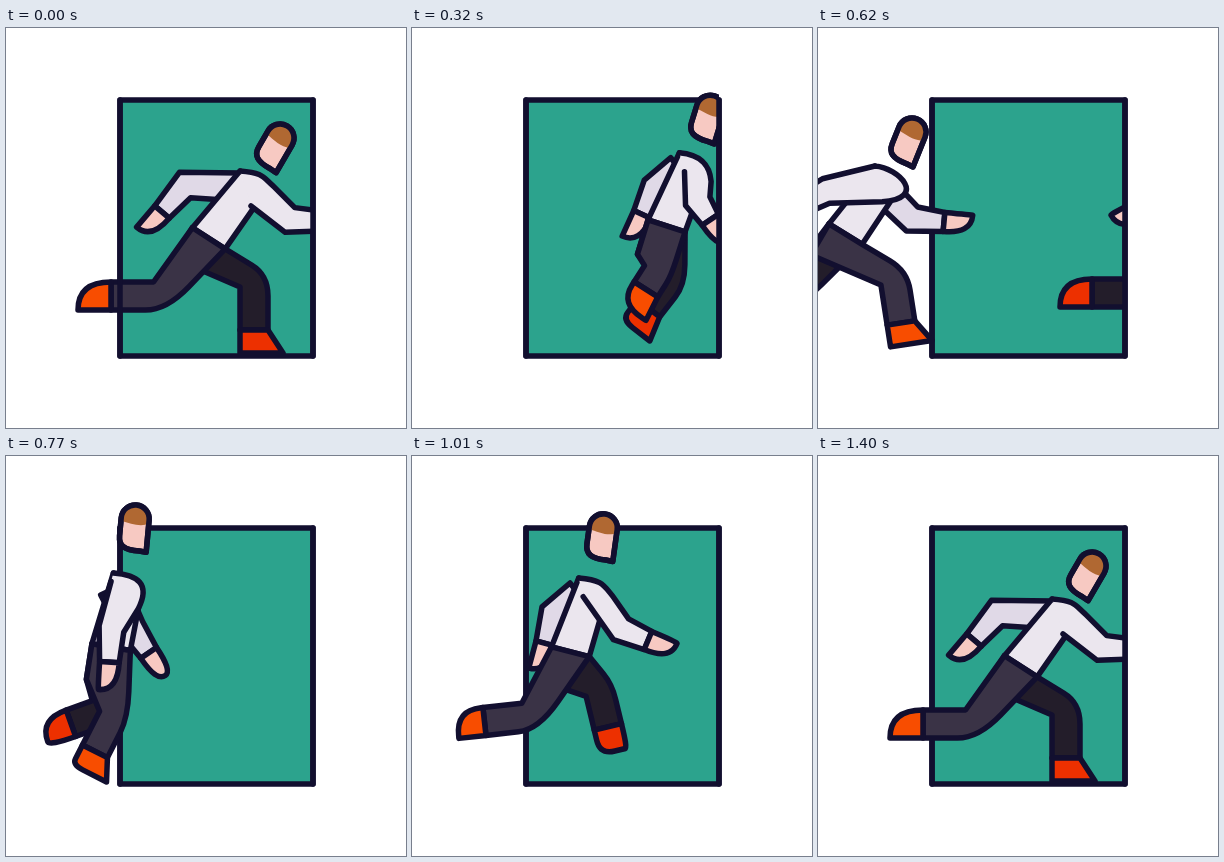
Animation of 400x400 px, one loop 1460 ms. Source, as an HTML page with a canvas:

```html
<!DOCTYPE html>
<html lang="en">
<head>
<meta charset="utf-8">
<title>Runner through a door</title>
<style>
  html, body { margin: 0; width: 100%; height: 100%; overflow: hidden; background: #fff; }
  canvas { display: block; width: 400px; height: 400px; }
</style>
</head>
<body>
<canvas id="stage" width="400" height="400"></canvas>
<script>
const ctx = document.getElementById('stage').getContext('2d');

const LOOP = 1460, HOLD = 230, TICK = 30, STEPS = 40, STRIDE = 350;
const DOOR = { x: 114, y: 72, w: 193, h: 256 };
const INK = '#120f2f', GREEN = '#2ca38d', SKIN = '#f7c9c2', HAIR = '#b06832', SHIRT = '#ebe6ee';
const NEAR = { leg: '#3a3346', shoe: '#f84d00', sleeve: SHIRT };
const FAR = { leg: '#231d2a', shoe: '#ed3000', sleeve: '#e0d9e7' };

// Pose tracks: one value per key step, limbs relative to the neck.
const KEYS = [0, 8, 14, 18, 23, 32, STEPS];
const body = {
  x: [234, 303, 407, 451, 478, 561],
  y: [143, 115, 138, 118, 115, 135],
  lean: [40, 17, 38.5, 18, 14.5, 34]
};
const head = {
  x: [40, 23, 37, 22, 21.5, 31.5],
  y: [-33, -53, -34, -54, -53.5, -43],
  tilt: [30, 6, 22, 6, 4, 17]
};
const nearArm = {
  ex: [50, -21, -49, -12, 33, 48], ey: [49, 47, 25, 56, 55, 47],
  wx: [83, -35, -85, -20, 50, 81], wy: [50, 82, 44, 90, 78, 49],
  px: [11, 0, 0, -2, -3, 15], py: [35, 3, 0, 8, 10, 31]
};
const farArm = {
  ex: [-55, 12, 37, 22, 3, -53], ey: [14, 54, 53, 55, 50, 19],
  wx: [-78, 18, 69, 42, 8, -72], wy: [41, 80, 56, 80, 78, 47]
};
const nearLeg = {
  kx: [-80, 30, 19, 5, -22, -73], ky: [125, 112, 112, 140, 144, 129],
  ax: [-129, 51, 26, -8, -62, -120], ay: [125, 150, 157, 180, 158, 131],
  len: [33, 20, 22, 22, 24, 31], toe: [0, 7, 14, 12, 0, 0], curl: [1, .6, 0, .2, .8, 1]
};
const farLeg = {
  kx: [14, -42, -82, -18, 19, 21], ky: [110, 143, 127, 140, 117, 110],
  ax: [14, -88, -133, -60, 14.5, 37], ay: [159, 149, 127, 150, 151, 146],
  len: [23, 28, 32, 28, 28, 21], toe: [15, 0, 0, -3, -13, 14], curl: [0, .8, 1, 1, 1, 0]
};

// Monotone cubic through the keys; start scales the first slope, the last is flat.
function sample(track, step, start, gain = 0) {
  const v = [...track, track[0] + gain], last = KEYS.length - 1;
  let i = 0;
  while (i < last - 1 && step > KEYS[i + 1]) i++;
  const rate = j => (v[j + 1] - v[j]) / (KEYS[j + 1] - KEYS[j]);
  const slope = j => {
    if (j === 0) return rate(0) * start;
    if (j === last) return 0;
    const a = rate(j - 1), b = rate(j);
    return a * b > 0 ? 2 * a * b / (a + b) : 0;
  };
  const h = KEYS[i + 1] - KEYS[i], u = (step - KEYS[i]) / h, w = 1 - u;
  return v[i] * w * w * (1 + 2 * u) + v[i + 1] * u * u * (1 + 2 * w)
    + h * u * w * (slope(i) * w - slope(i + 1) * u);
}
const pose = (part, step) =>
  Object.fromEntries(Object.keys(part).map(k => [k, sample(part[k], step, .25)]));

const rad = deg => deg * Math.PI / 180;
const go = (p, d, k) => [p[0] + d[0] * k, p[1] + d[1] * k];
const mix = (a, b, u) => [a[0] + (b[0] - a[0]) * u, a[1] + (b[1] - a[1]) * u];
const line = (...pts) => pts.forEach(p => ctx.lineTo(...p));
const quad = (c, p) => ctx.quadraticCurveTo(...c, ...p);
function dir(a, b) {
  const x = b[0] - a[0], y = b[1] - a[1], n = Math.hypot(x, y) || 1;
  return [x / n, y / n];
}
const front = d => [d[1], -d[0]];

// Rounded corner c on the way from a to b.
function bend(a, c, b, r) {
  line(mix(c, a, r));
  quad(c, mix(c, b, r));
}

// Front and back corners of a limb at joint b.
function joint(a, b, c, half) {
  const m = front(dir(a, b)), n = front(dir(b, c));
  const k = half / Math.max(.4, 1 + m[0] * n[0] + m[1] * n[1]);
  const s = [m[0] + n[0], m[1] + n[1]];
  return [go(b, s, k), go(b, s, -k)];
}
function cuff(a, b, half) {
  const n = front(dir(a, b));
  return [go(b, n, half), go(b, n, -half)];
}

function shape(fill, trace, closed = true) {
  ctx.beginPath();
  trace();
  if (closed) ctx.closePath();
  ctx.fillStyle = fill;
  ctx.fill();
  ctx.stroke();
}

// Hand or shoe at the end of a limb.
function tip(fill, [f, b], d, len, toe, curl) {
  const end = go(go(f, d, len), front(d), toe);
  shape(fill, () => {
    line(f);
    quad(toe < 0 ? go(f, d, len) : mix(f, end, .5), end);
    bend(end, go(b, d, len), b, curl);
    line(b);
  });
}
function hand(elbow, wrist, ends) {
  const d = dir(elbow, wrist);
  const side = Math.max(-1, Math.min(1, (d[0] - .5) * 2));
  tip(SKIN, ends, d, 28, (side - 1) * 9.5, 1);
}

function drawFarArm(p) {
  const s = [0, 16], e = [p.ex, p.ey], w = [p.wx, p.wy];
  const [sf, sb] = cuff(e, s, 14), [ef, eb] = joint(s, e, w, 12.5), ends = cuff(e, w, 9.5);
  shape(FAR.sleeve, () => line(sb, ef, ends[0], ends[1], eb, sf));
  hand(e, w, ends);
}

function drawNearArm(p) {
  const s = [16, 20], e = [p.ex, p.ey], w = [p.wx, p.wy], d = dir(s, e);
  const [ef, eb] = joint(s, e, w, 12.5), ends = cuff(e, w, 9.8);
  const cap = go(go(s, front(d), 15), d, 10);
  const pull = go(cap, d, -14 - 32 * Math.max(0, -d[0]));
  shape(NEAR.sleeve, () => {
    line([0, 0]);
    ctx.bezierCurveTo(24, 2, ...pull, ...cap);
    line(ef, ends[0], ends[1], eb, [p.px, p.py]);
  }, false);
  hand(e, w, ends);
}

function drawLeg(p, tone, back, fore, lean) {
  const k = [p.kx, p.ky], a = [p.ax, p.ay];
  const [kf, kb] = joint(mix(back, fore, .5), k, a, 14), ends = cuff(k, a, 14);
  const t = rad(lean - 8), rump = go(back, [-Math.sin(t), Math.cos(t)], 36);
  const n = front(dir(back, kb));
  const bulge = (rump[0] - back[0]) * n[0] + (rump[1] - back[1]) * n[1] < 0;
  shape(tone.leg, () => {
    line(back, fore);
    bend(fore, kf, ends[0], .38);
    line(ends[0], ends[1], kb);
    if (bulge) line(rump);
  });
  tip(tone.shoe, ends, dir(k, a), p.len, p.toe, p.curl);
}

function drawHead(p) {
  const r = 14;
  const face = () => {
    ctx.arc(0, 0, r, Math.PI, 0);
    line([r, 32], [7, 31.5]);
    ctx.bezierCurveTo(-8, 32, -r, 28, -r, 18);
  };
  ctx.save();
  ctx.translate(p.x, p.y);
  ctx.rotate(rad(p.tilt));
  shape(SKIN, face);
  ctx.beginPath();
  ctx.arc(0, 0, r, Math.PI, 0);
  line([r, 3]);
  ctx.bezierCurveTo(7, 8, -4, 5, -r, 3);
  ctx.fillStyle = HAIR;
  ctx.fill();
  ctx.beginPath();
  face();
  ctx.closePath();
  ctx.stroke();
  ctx.restore();
}

function drawRunner(step, shift) {
  const lean = sample(body.lean, step, 1.2), t = rad(lean), w = rad(lean - 7);
  const back = [-74 * Math.sin(t), 74 * Math.cos(t)];
  const fore = go(back, [Math.cos(w), Math.sin(w)], 39);
  ctx.save();
  ctx.beginPath();
  ctx.rect(0, 0, DOOR.x + DOOR.w, 400);
  ctx.clip();
  ctx.translate(sample(body.x, step, 1.2, STRIDE) + shift, sample(body.y, step, 1.2));
  drawFarArm(pose(farArm, step));
  drawLeg(pose(farLeg, step), FAR, back, fore, lean);
  shape(SHIRT, () => {
    line([0, 0]);
    bend([0, 0], [29, 15], fore, .3);
    line(fore, back);
  });
  drawLeg(pose(nearLeg, step), NEAR, back, fore, lean);
  drawNearArm(pose(nearArm, step));
  drawHead(pose(head, step));
  ctx.restore();
}

function post(x) {
  ctx.beginPath();
  line([x, DOOR.y], [x, DOOR.y + DOOR.h]);
  ctx.stroke();
}

function draw(step) {
  ctx.fillStyle = '#fff';
  ctx.fillRect(0, 0, 400, 400);
  ctx.strokeStyle = INK;
  ctx.lineWidth = 5.5;
  ctx.lineJoin = ctx.lineCap = 'round';
  shape(GREEN, () => ctx.rect(DOOR.x, DOOR.y, DOOR.w, DOOR.h));
  drawRunner(step, 0);
  post(DOOR.x);
  drawRunner(step, -STRIDE);
  post(DOOR.x + DOOR.w);
}

function tick(now) {
  const t = now % LOOP;
  draw(t < HOLD ? 0 : Math.min(STEPS, Math.floor((t - HOLD) / TICK) + 1));
  requestAnimationFrame(tick);
}
requestAnimationFrame(tick);
</script>
</body>
</html>
```
